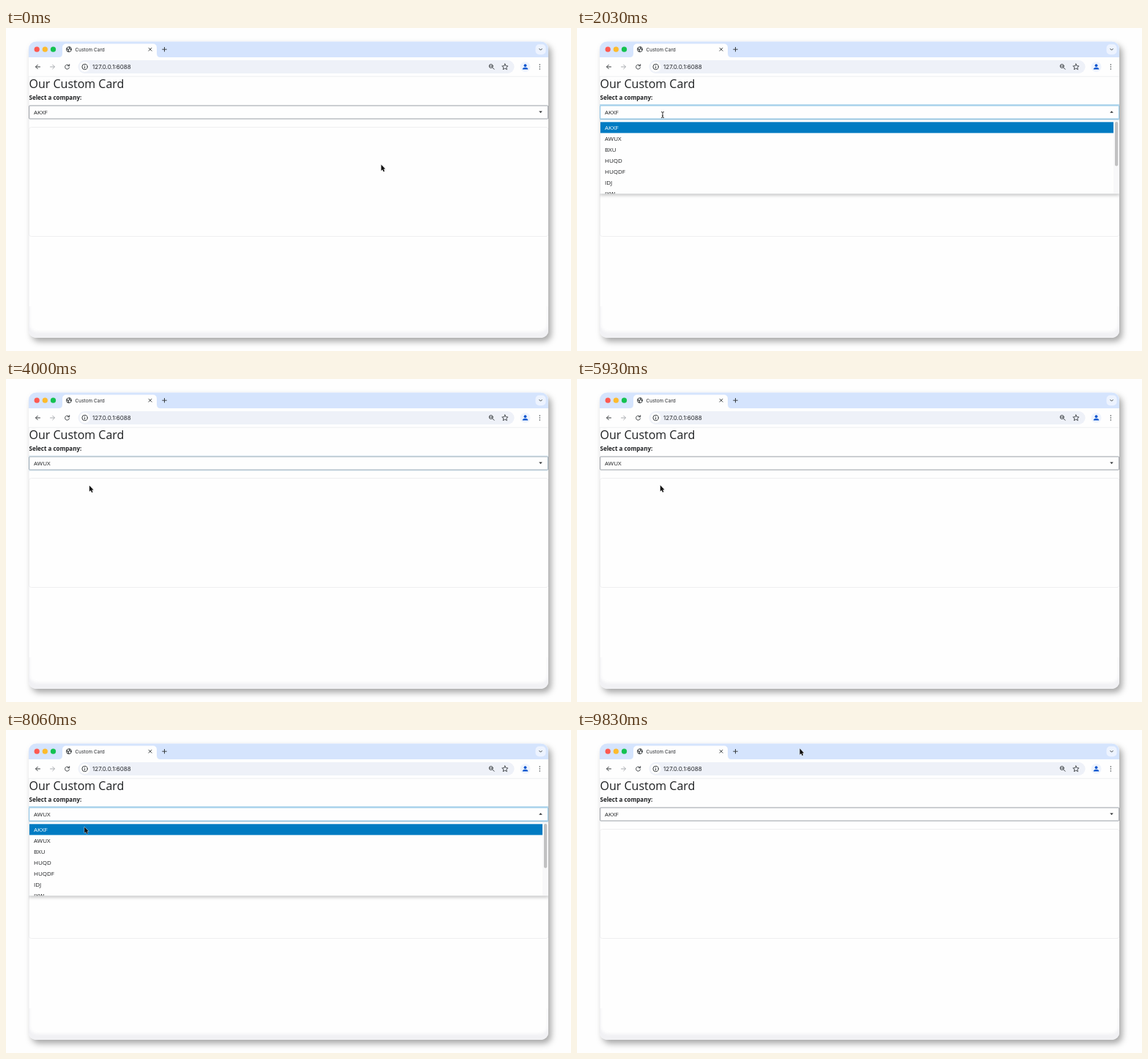
Recreate the animation shown at these times as an HTML page. Size 772 by 441 pixels, loop 9.86 s.

```html
<!DOCTYPE html>
<html lang="en">
<head>
<meta charset="utf-8">
<title>Custom Card</title>
<style>
html, body { margin: 0; width: 100%; height: 100%; overflow: hidden; background: #fefefe; }
svg { display: block; width: 772px; height: 441px; }
text { font: 8px "Open Sans", "Noto Sans", sans-serif; fill: #1d1f21; white-space: pre; }
.chrome { font-family: Inter, Roboto, sans-serif; fill: #25282c; }
.tab { font-size: 6.5px; }
.title { font-size: 16px; }
.label { font-weight: 700; }
.icon { fill: none; stroke: #3c4043; stroke-width: 1; stroke-linecap: round; stroke-linejoin: round; }
.frame { filter: drop-shadow(4px 5px 4px rgba(0, 0, 0, .34)); }
.panel { filter: drop-shadow(0 2px 2px rgba(0, 0, 0, .22)); }
.soft { filter: blur(2px); }
</style>
</head>
<body>
<svg viewBox="0 0 772 441">
  <defs>
    <clipPath id="windowClip"><rect x="31" y="18.5" width="710" height="404.5" rx="10"/></clipPath>
    <clipPath id="listClip"><rect x="31" y="126" width="710" height="100.3"/></clipPath>
  </defs>
  <rect class="frame" x="31" y="18.5" width="710" height="404.5" rx="10" fill="#fefefe"/>

  <g clip-path="url(#windowClip)">
    <rect x="31" y="380" width="710" height="43" fill="#f1f1f4"/>
    <rect class="soft" x="32" y="340" width="708" height="75" rx="11" fill="#fefefe"/>
    <rect x="31" y="18" width="710" height="362" fill="#fefefe"/>
    <path d="M31.3 66V415" stroke="#ececef" stroke-width=".6"/>

    <!-- tab strip -->
    <rect x="31" y="18" width="710" height="22" fill="#d5e4fd"/>
    <path d="M72 40Q77 40 77 35V27Q77 21.5 82.500 21.500H200.500Q206 21.500 206 27V35Q206 40 211 40Z" fill="#fefefe"/>
    <circle cx="42.200" cy="29.200" r="3.600" fill="#fe5951"/>
    <circle cx="53.300" cy="29.200" r="3.600" fill="#fdbb2d"/>
    <circle cx="64.500" cy="29.200" r="3.600" fill="#14c251"/>
    <g class="icon">
      <circle cx="86" cy="29.200" r="3.500"/>
      <path d="M83 28.300L85.500 29.600L85 32M87 26L86.500 28L89 29.500" stroke-width="1.300"/>
      <path d="M195 27.200L199 31.200M199 27.200L195 31.200"/>
      <path d="M216.500 26.400V32M213.700 29.200H219.300"/>
    </g>
    <text class="chrome tab" x="94.600" y="31.600">Custom Card</text>
    <rect x="723.500" y="22.300" width="14" height="14" rx="5" fill="#edf3ff"/>
    <path class="icon" d="M728.700 28.400L730.500 30.200L732.300 28.400"/>

    <!-- toolbar -->
    <g class="icon">
      <path d="M46.500 53H40.700M43.300 50.200L40.500 53L43.300 55.800"/>
      <path d="M60.500 53H66.300M63.700 50.200L66.500 53L63.700 55.800" stroke="#a9acb0"/>
      <path d="M86 51.300A3 3 0 1 0 86.500 54M86.700 49.700V51.800H84.500"/>
    </g>
    <rect x="98.500" y="44" width="596" height="18" rx="9" fill="#eef1f8"/>
    <circle cx="107.600" cy="53" r="7" fill="#fefefe"/>
    <circle class="icon" cx="107.600" cy="53" r="3.700"/>
    <path class="icon" d="M107.600 52.800V54.900M107.600 51V51.100"/>
    <text class="chrome" x="118" y="55.900">127.0.0.1:6088</text>
    <g class="icon">
      <circle cx="662.700" cy="52" r="2.500"/>
      <path d="M664.700 54L667 56.300M661.700 52H663.700"/>
      <path d="M681.800 49L683 51.700L685.900 52L683.700 53.900L684.400 56.700L681.800 55.200L679.200 56.700L679.900 53.900L677.700 52L680.600 51.700Z" stroke-width=".9"/>
    </g>
    <circle cx="709.500" cy="53" r="7" fill="#eff4fd"/>
    <path d="M705.800 56.500V55.600Q706.500 53.800 709.500 53.800T713.200 55.600V56.500Z" fill="#0b57d0"/>
    <circle cx="709.500" cy="51.200" r="1.900" fill="#0b57d0"/>
    <path d="M729.300 50V50.010M729.300 53V53.010M729.300 56V56.010" stroke="#3c4043" stroke-width="1.500" stroke-linecap="round"/>
    <path d="M31 66.200H741" stroke="#e6e8eb" stroke-width=".7"/>

    <!-- page -->
    <text class="title" x="31.500" y="81.700">Our Custom Card</text>
    <text class="label" x="31.500" y="98.300">Select a company:</text>
    <rect x="31.500" y="135.500" width="709.500" height="149" rx="3" fill="none" stroke="#ebebed" stroke-width=".8"/>

    <rect x="31.600" y="106" width="709" height="18" rx="1" fill="#fefefe" stroke="#8e949b" stroke-width=".9"/>
    <g id="focus">
      <rect x="29.600" y="103.900" width="713" height="22.200" rx="2" fill="#bfdef0"/>
      <rect x="31.600" y="106" width="709" height="18" rx="1" fill="#fefefe" stroke="#80bde1" stroke-width=".9"/>
    </g>
    <text id="value" x="38" y="117.700"></text>
    <path id="caret" d="M0 109.500V120" stroke="#222" stroke-width=".8"/>
    <path id="toggle" d="M-2.300 -1.200H2.300L0 1.300Z" fill="#2b2e31"/>

    <g id="list">
      <rect class="panel" x="31.400" y="125.800" width="709.600" height="100.400" fill="#fefefe" stroke="#dfe2e5" stroke-width=".5"/>
      <rect x="733" y="126.200" width="8" height="99.800" fill="#f8f8f9"/>
      <rect x="735" y="128" width="4.200" height="60.500" rx="2.100" fill="#c1c1c2"/>
      <rect id="bar" x="32" width="701" height="15" fill="#007bc2"/>
      <g id="options" clip-path="url(#listClip)"></g>
    </g>
  </g>

  <path id="arrow" d="M0 0V8.400L1.900 6.700L3.200 9.700L4.700 9L3.400 6.100H5.800Z" fill="#111" stroke="#fff" stroke-width=".8" paint-order="stroke"/>
  <path id="beam" d="M-2 -4Q0 -4 0 -2.800Q0 -4 2 -4M0 -3V3M-2 4Q0 4 0 2.800Q0 4 2 4M-1 1.300H1" fill="none" stroke="#222" stroke-width=".9"/>
</svg>

<script>
const LOOP = 9860;
const FADE = 150;
const NAMES = ["AKXF", "AWUX", "BXU", "HUQD", "HUQDF", "IDJ", "IXW"];
const OPEN = [[1500, 3900], [6430, 8600]];
const CARET = [[1530, 2030], [2560, 3060], [3560, 3900], [6430, 6930], [7430, 7940], [8430, 8600]];
const BEAM = [[665, 2790], [6230, 7430]];

// Pointer moves: start, end, x, y reached.
const MOVES = [
  [70, 230, 480.6, 185.7],
  [430, 700, 167, 123],
  [1000, 1230, 117, 122.3],
  [1500, 1660, 117, 118.5],
  [2670, 3060, 114.4, 145.2],
  [3270, 3360, 113.9, 145.4],
  [5900, 6380, 102.5, 121],
  [6930, 7030, 102.5, 122.5],
  [7200, 7460, 104, 125.2],
  [7570, 8060, 107.2, 132.3],
  [8060, 8160, 106.4, 132.8],
  [9430, 9830, 304.4, 25.3]
];

const $ = id => document.getElementById(id);
const within = (spans, t) => spans.some(([a, b]) => t >= a && t < b);
const clamp = v => Math.min(1, Math.max(0, v));
const ease = v => v * v * (3 - 2 * v);
const show = (id, on) => $(id).setAttribute("visibility", on ? "visible" : "hidden");

const options = NAMES.map((name, i) => {
  const el = document.createElementNS($("list").namespaceURI, "text");
  el.setAttribute("x", 38);
  el.setAttribute("y", 138.7 + 15 * i);
  el.textContent = name;
  return $("options").appendChild(el);
});

function pointer(t) {
  let x = 512.6, y = 186.5;
  for (const [start, end, toX, toY] of MOVES) {
    const k = ease(clamp((t - start) / (end - start)));
    x += (toX - x) * k;
    y += (toY - y) * k;
  }
  return `translate(${x} ${y})`;
}

function focusAmount(t) {
  return OPEN.reduce((sum, [a, b]) =>
    sum + ease(clamp((t - a) / FADE)) - ease(clamp((t - b) / FADE)), 0);
}

function draw(t) {
  const open = within(OPEN, t);
  const chosen = t >= 3900 && t < 8600 ? 1 : 0;
  const active = t >= 2900 && t < 7700 ? 1 : 0;
  const typing = within(BEAM, t);

  $("focus").setAttribute("opacity", focusAmount(t));
  $("value").textContent = NAMES[chosen];
  $("caret").setAttribute("transform", `translate(${chosen ? 61.2 : 57.4} 0)`);
  $("toggle").setAttribute("transform", `translate(730.5 114.6) scale(1 ${open ? -1 : 1})`);
  $("bar").setAttribute("y", 128.4 + 15 * active);
  options.forEach((el, i) => { el.style.fill = i === active ? "#fff" : ""; });

  show("caret", within(CARET, t));
  show("list", open);
  show("arrow", !typing);
  show("beam", typing);
  const place = pointer(t);
  $("arrow").setAttribute("transform", place);
  $("beam").setAttribute("transform", place);
}

const began = performance.now();
function tick() {
  draw((performance.now() - began) % LOOP);
  requestAnimationFrame(tick);
}
tick();
</script>
</body>
</html>
```
